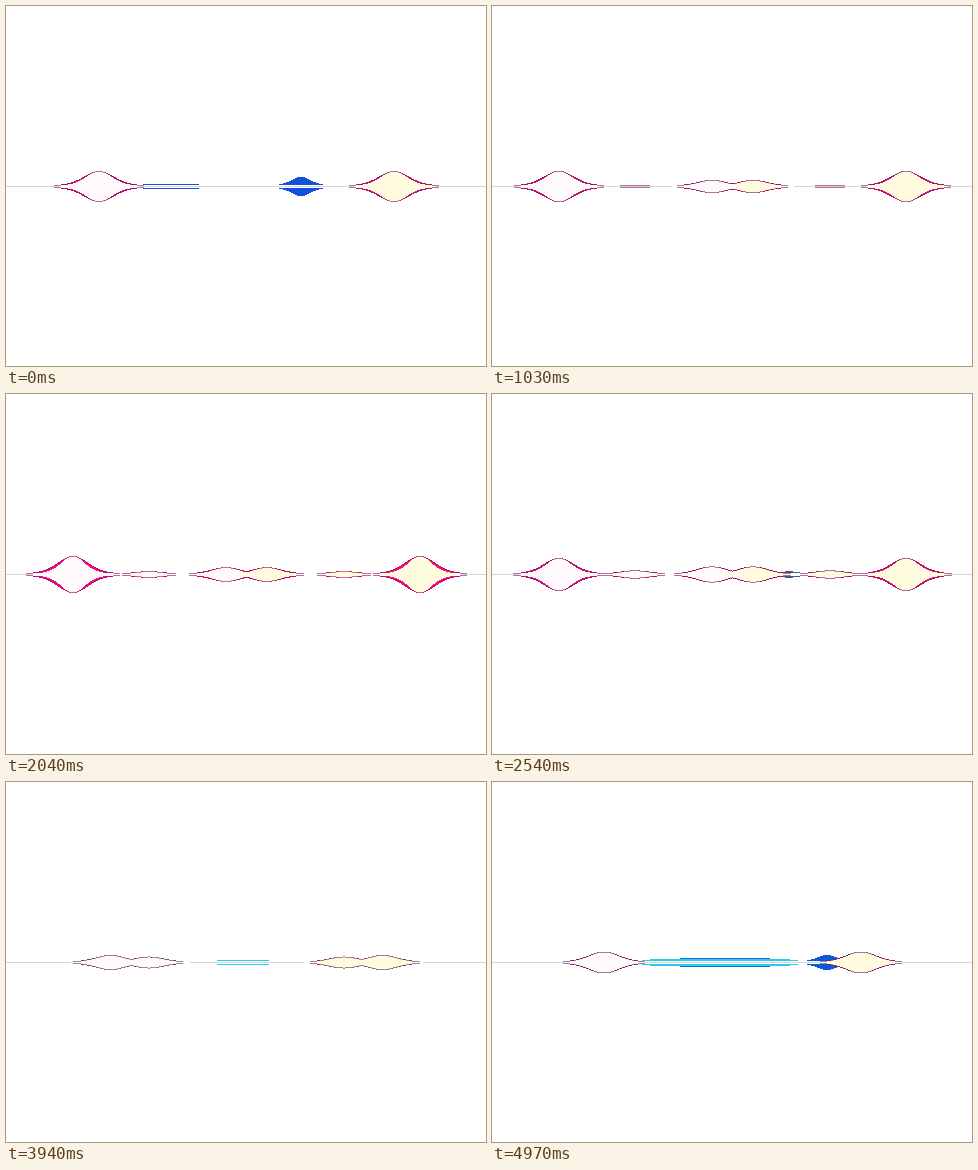
Write an HTML page with a canvas that moves like this. It is 480 by 360 pixels and loops after 5.01 s.

```html
<!DOCTYPE html>
<html lang="en">
<head>
<meta charset="utf-8">
<title>Voice wave</title>
<style>
  html, body { margin: 0; width: 100%; height: 100%; overflow: hidden; background: #fff; }
  canvas { display: block; }
</style>
</head>
<body>
<canvas id="stage" width="480" height="360"></canvas>
<script>
const ctx = document.getElementById('stage').getContext('2d');
const LOOP = 5010, WIDTH = 480, AXIS = 180.5, MID = 240.5;
const TALLEST = 18, PINK_SPREAD = 21, BLUE_SPREAD = 14;

const clamp = p => Math.min(1, Math.max(0, p));
const ease = p => Math.sin(clamp(p) * Math.PI / 2);
const bell = (dx, spread) => (4 / (4 + (dx / spread) ** 2)) ** 4;
const slab = (dx, half) => Math.max(0, 1 - (dx / half) ** 8);

// A bump swells from `from` over `rise` ms and is gone by `to` after `fall` ms
const bump = (at, peak, from, rise, to, fall, color) => ({
  at, color,
  height: t => peak * ease((t - from) / rise) * ease((to - t) / fall)
});

// Mirrored pairs, placed by their distance from the middle
const pairs = [
  bump(147.5, 15, -800, 800, 800, 800),
  bump(173.5, TALLEST, 270, 1200, 3340, 1140),
  bump(97.5, 2.8, 800, 900, 2900, 600),
  bump(97.5, 16.8, 2350, 1400, 4010, 330),
  bump(20.5, 6, 400, 500, 1950, 750),
  bump(20.5, 7.6, 1400, 900, 3340, 700),
  bump(136, 10.2, 3700, 500, 4700, 400),
  bump(128.5, 10.4, 4200, 700, 6000, 400)
];

const blues = [
  bump(295, 9, -500, 500, 500, 500, '#1450dc'),
  bump(297, 2.6, 2300, 240, 2800, 260, '#46587f'),
  bump(335, 7, 4450, 520, 6000, 500, '#0a5ad8')
];

// Hard-edged columns, mirrored about the axis and lifted slightly off it
function columns(height, paint) {
  for (let x = 0; x < WIDTH; x++) {
    const h = height(x + .5);
    if (h < .7) continue;
    const top = Math.round(AXIS - h - .6), bottom = Math.round(AXIS + h + .6);
    paint(x, top, bottom);
  }
}

function fill(height, color) {
  ctx.fillStyle = color;
  columns(height, (x, top, bottom) => ctx.fillRect(x, top, 1, bottom - top));
}

function outline(height, color) {
  ctx.fillStyle = color;
  columns(height, (x, top, bottom) => {
    ctx.fillRect(x, top, 1, 1);
    ctx.fillRect(x, bottom - 1, 1, 1);
  });
}

const gap = height => fill(x => Math.min(height(x), .8), '#fff');

const inside = ctx.createLinearGradient(225, 0, 255, 0);
inside.addColorStop(0, '#fefafc');
inside.addColorStop(1, '#fffbdf');

function drawBlue(t) {
  for (const b of blues) {
    const h = b.height(t);
    const shape = x => h * bell(x - b.at, BLUE_SPREAD);
    fill(shape, b.color);
    gap(shape);
  }

  const thin = 1.6 * (1 - t / 400);
  const line = x => thin * slab(x - 165, 36);
  fill(line, '#1450dc');
  gap(line);

  // Cyan band widens and drifts left towards the end
  const p = clamp((t - 3600) / 1370);
  const center = 240 - 12 * p, half = 18 + 66 * p, h = 3.1 * Math.sqrt(p);
  const core = x => h * slab(x - center, half);
  fill(x => (h + 1) * p * slab(x - center - 5, half * .67), '#1266d6');
  fill(core, '#2accee');
  gap(core);
}

function drawPink(t) {
  const live = pairs.map(({ at, height }) => ({ at, h: height(t) }));
  const profile = spread => x => {
    const dx = Math.abs(x - MID);
    return Math.max(...live.map(({ at, h }) => h * bell(dx - at, spread)));
  };

  // Taller waves glow brighter and show wider flanks
  const k = Math.max(...live.map(b => b.h)) / TALLEST;
  const glow = k ** 3;
  const red = 160 + 82 * glow, green = 70 - 58 * k;
  const outer = profile(PINK_SPREAD);

  fill(outer, `rgb(${red},${green},124)`);
  gap(outer);
  fill(profile(PINK_SPREAD * (.91 - .15 * glow)), inside);
  outline(outer, `rgba(${red * .6},${green},90,.6)`);
}

function draw(t) {
  ctx.fillStyle = '#fff';
  ctx.fillRect(0, 0, WIDTH, 360);
  drawBlue(t);
  drawPink(t);
  ctx.fillStyle = 'rgba(120,120,120,.3)';
  const tall = pairs.map(b => ({ at: b.at, h: b.height(t) })).filter(b => b.h > 2);
  const clear = x => tall.every(b => Math.abs(Math.abs(x - MID) - b.at) > 40);
  for (let x = 0; x < WIDTH; x++) if (clear(x)) ctx.fillRect(x, 180, 1, 1);
}

const start = performance.now();
function tick() {
  draw((performance.now() - start) % LOOP);
  requestAnimationFrame(tick);
}
tick();
</script>
</body>
</html>
```
